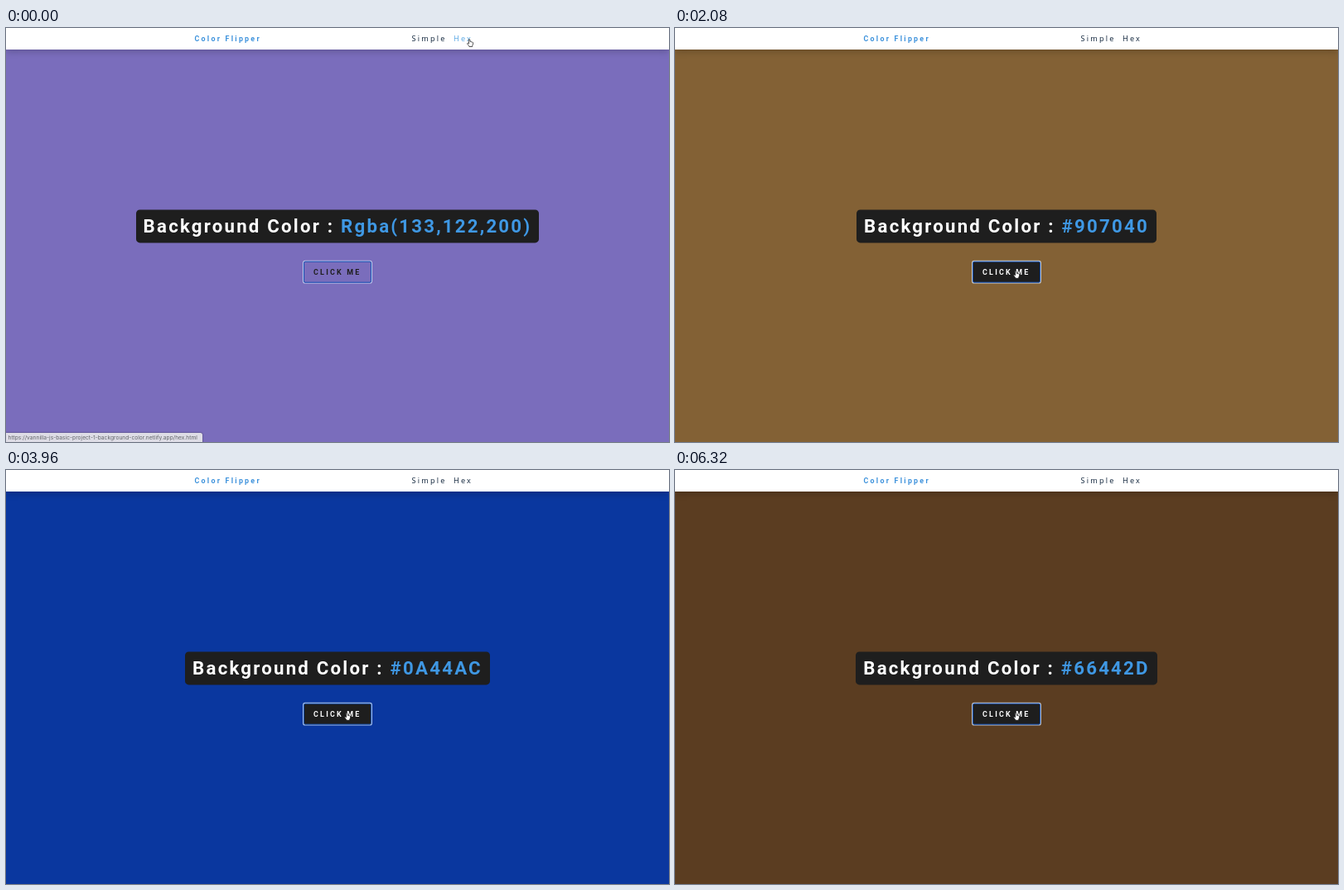
Write an HTML page that moves like this. It is 800 px wide and 500 px high and loops after 6360 ms.

```html
<!DOCTYPE html>
<html lang="en">
<head>
<meta charset="utf-8">
<title>Color Flipper</title>
<style>
  html, body { margin: 0; width: 100%; height: 100%; overflow: hidden; }
  #stage { position: relative; width: 800px; height: 500px; overflow: hidden; font-family: Roboto, sans-serif; }
  #stage > * { position: absolute; box-sizing: border-box; white-space: pre; }
  nav { left: 0; top: 0; width: 800px; height: 26px; background: #fff; box-shadow: 0 2.8px 8.3px rgba(0, 0, 0, .22); }
  nav span { position: absolute; top: 0; line-height: 26.6px; }
  .brand { left: 227.5px; font-size: 8.89px; font-weight: 700; letter-spacing: 2.24px; color: #3d92dc; }
  .link { font: 500 9.1px/26.6px "Open Sans", sans-serif; letter-spacing: 2.22px; color: #0c2138; }
  .row { left: 0; top: 219px; width: 800px; display: flex; justify-content: center; transform: translateY(.4px); }
  h2 { margin: 0; height: 40px; padding: 0 8.9px; border-radius: 4.5px; background: #1e1e1e; color: #fff;
       font-size: 22.22px; line-height: 40px; font-weight: 700; letter-spacing: 2.22px; }
  #value { color: #3f98e4; }
  #btn { left: 359px; top: 282px; width: 82px; height: 26px; border: 1.2px solid #1e1e1e; border-radius: 3px;
         padding-left: 11.1px; font-size: 8.89px; line-height: 25.4px; font-weight: 700; letter-spacing: 2.22px;
         transform: translateY(-.3px); }
  #status { left: 0; top: 488.5px; height: 14px; padding-left: 2.5px; border-radius: 0 2.5px 0 0; color: #62656a;
            font: 6.67px/12px Inter, sans-serif; box-shadow: 0 0 2px rgba(0, 0, 0, .55); }
  #cursor { left: 0; top: 0; width: 12px; height: 14px; overflow: visible; }
</style>
</head>
<body>
<div id="stage">
  <nav>
    <span class="brand">Color Flipper</span>
    <span class="link" style="left:489.5px">Simple</span>
    <span class="link" id="hex" style="left:540px">Hex</span>
  </nav>
  <div class="row"><h2>Background Color : <span id="value"></span></h2></div>
  <div id="btn">CLICK ME</div>
  <div id="status"></div>
  <svg id="cursor">
    <path id="arrow" d="M0 0V8.2L1.9 6.5L3.1 9.3L4.5 8.7L3.3 6H5.8Z" fill="#000" stroke="#fff" stroke-width=".6"/>
    <path id="hand" d="M-.8 .5Q0-.5 .8 .5L1.1 3.1Q1.9 2.5 2.4 3.3Q3.2 2.8 3.6 3.7Q4.5 3.5 4.6 4.6Q4.7 6.6 3.7 7.7V9H-.1L-.5 7.9L-2.3 5.7Q-2.6 4.6-1.4 4.7L-.4 5.4Z"
          fill="#fff" stroke="#111" stroke-width=".7" stroke-linejoin="round"/>
  </svg>
</div>
<script>
  const LOOP = 6360;
  const $ = id => document.getElementById(id);

  // start time, label, background as displayed
  const colors = [
    [0, "Rgba(133,122,200)", "#7a6dbc"],
    [700, "#F1f5f8", "#edf1f5"],
    [1800, "#907040", "#836135"],
    [3080, "#F743EA", "#f337e3"],
    [3720, "#0A44AC", "#0a379f"],
    [5640, "#AEE2B8", "#a3dcaf"],
    [6280, "#66442D", "#5b3d21"]
  ];
  const host = "vannilla-js-basic-project-1-background-color.netlify.app";
  // start time, text, width, background
  const statuses = [
    [0, `https://${host}/hex.html`, 236.5, "#dedde6"],
    [240, `Waiting for ${host}...`, 266, "#f7f8f9"],
    [880, "", 0, "#fff"]
  ];
  const LEAVE = 480, MID = 760, ARRIVE = 1080, HOVER = 1010;
  const points = [[559, 13.5], [469.5, 198.5], [411, 293.3]];

  const at = (steps, t) => steps.filter(s => s[0] <= t).pop();
  const clamp = v => Math.min(1, Math.max(0, v));
  const lerp = (a, b, p) => a + (b - a) * p;
  const gray = (a, b, p) => { const v = Math.round(lerp(a, b, p)); return `rgb(${v},${v},${v})`; };

  function cursorAt(t) {
    const first = t < MID;
    const p = clamp(first ? (t - LEAVE) / (MID - LEAVE) : (t - MID) / (ARRIVE - MID));
    const eased = first ? p * p : 1 - (1 - p) ** 2;
    const [a, b] = first ? points : points.slice(1);
    return a.map((v, i) => lerp(v, b[i], eased));
  }

  function render(t) {
    const [, label, bg] = at(colors, t);
    $("stage").style.background = bg;
    if ($("value").textContent !== label) $("value").textContent = label;

    const [, text, width, fill] = at(statuses, t);
    const bar = $("status");
    bar.textContent = text;
    bar.style.width = width + "px";
    bar.style.background = fill;
    bar.style.display = text ? "block" : "none";

    const [x, y] = cursorAt(t);
    const onLink = y < 22, onBtn = t >= HOVER;
    $("cursor").style.transform = `translate(${x}px, ${y}px)`;
    $("hand").style.display = onLink || onBtn ? "" : "none";
    $("arrow").style.display = onLink || onBtn ? "none" : "";
    $("hex").style.color = onLink ? "#55a6e4" : "";

    const hover = clamp((t - HOVER) / 300);
    const focus = t < 700 || t >= 1800;
    const btn = $("btn").style;
    btn.background = `rgba(30,30,30,${hover})`;
    btn.color = gray(30, 255, hover);
    btn.borderColor = focus ? "#1550b4" : "#1e1e1e";
    btn.borderRadius = focus ? "2px" : "3px";
    btn.boxShadow = focus ? "0 0 0 .9px rgba(225,240,255,.8)" : "0 .6px 1.7px rgba(0,0,0,.2)";
  }

  function tick() {
    render(performance.now() % LOOP);
    requestAnimationFrame(tick);
  }
  tick();
</script>
</body>
</html>
```
